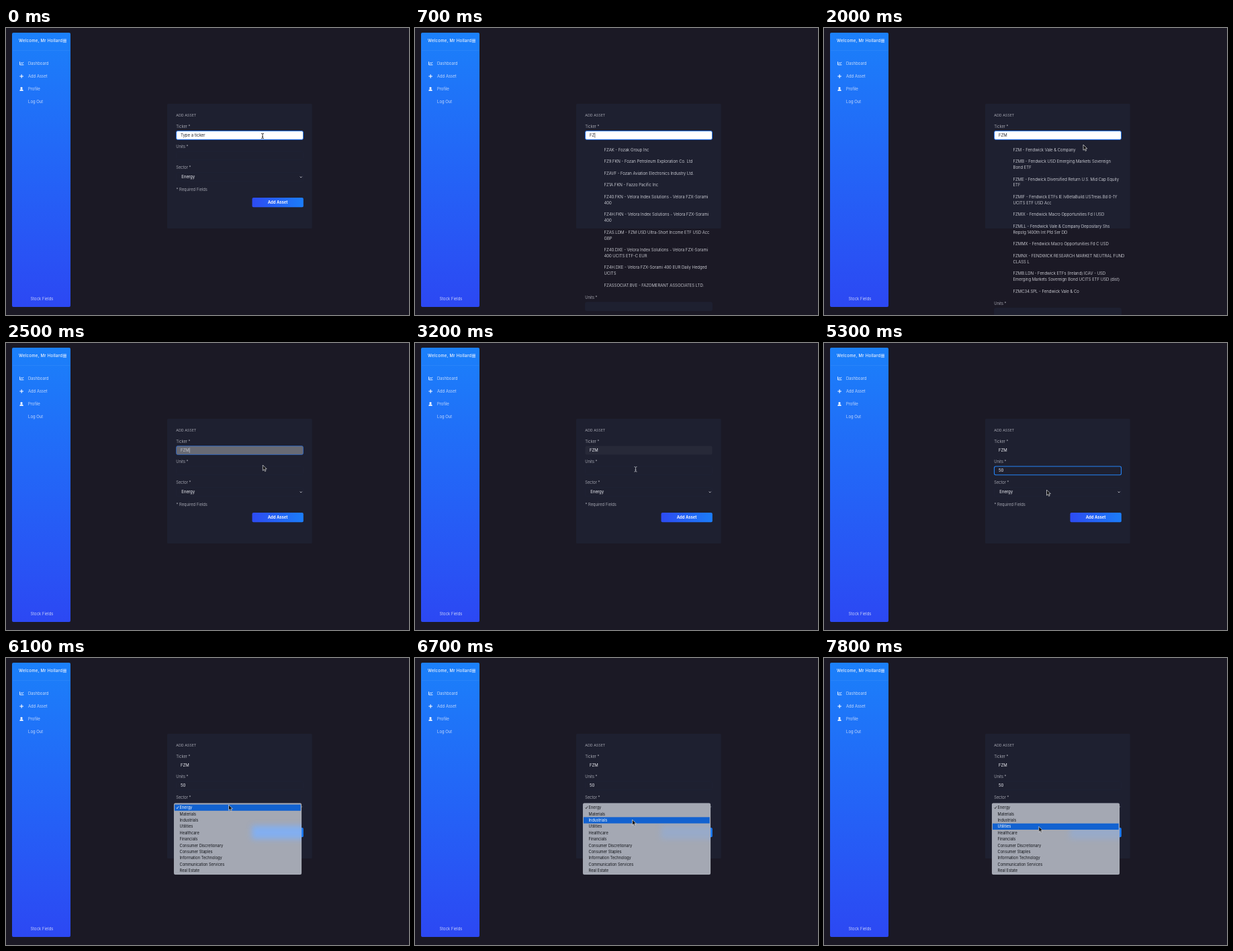
Write an HTML page that moves like this. It is 600 px wide and 428 px high and loops after 8000 ms.

```html
<!DOCTYPE html>
<html lang="en">
<head>
<meta charset="utf-8">
<title>Add asset</title>
<style>
  html, body { margin: 0; width: 100%; height: 100%; overflow: hidden; background: #1b1925; }
  svg { display: block; width: 100%; height: 100%; }
  text { font-family: Inter, "Open Sans", sans-serif; font-size: 6px; fill: #f4f5fb; white-space: pre; }
  .light { font-weight: 300; }
  .label { font-weight: 300; font-size: 5.8px; fill: #c9cad3; }
  .option { font-size: 5.65px; fill: #111318; }
</style>
</head>
<body>
<svg id="stage" viewBox="0 0 600 428">
  <defs>
    <linearGradient id="side" x1="0" y1="0" x2="0" y2="1">
      <stop stop-color="#1b80fa"/><stop offset="1" stop-color="#2c48f3"/>
    </linearGradient>
    <linearGradient id="button">
      <stop stop-color="#2d4bf2"/><stop offset="1" stop-color="#1b7df9"/>
    </linearGradient>
    <filter id="blur" x="-30%" y="-100%" width="160%" height="300%"><feGaussianBlur stdDeviation="4"/></filter>
    <clipPath id="menuClip"><rect x="250" y="216.5" width="190" height="106.5" rx="2"/></clipPath>
  </defs>

  <rect width="600" height="428" fill="#1b1925"/>
  <rect x="9" y="7" width="87" height="409" rx="2" fill="url(#side)"/>
  <path d="M10 33.5H95" stroke="#fff" stroke-opacity=".1" stroke-width=".5"/>
  <path d="M84.7 17H90M84.7 18.4H90M84.7 19.8H90M84.7 21.2H90" stroke="#e4eeff" stroke-width=".75"/>
  <g fill="none" stroke="#fff">
    <path d="M20.6 50.2V54.9H26.4M21.8 53.1L23.1 51.6L24.4 52.8L26.2 50.9" stroke-width=".9"/>
    <path d="M20.3 72H26M23.15 69.2V74.8" stroke-width="1.1"/>
  </g>
  <path d="M20.3 93.8Q20.3 91.3 23 91.3T25.8 93.8Z" fill="#fff"/>
  <circle cx="23" cy="89.5" r="1.6" fill="#fff"/>

  <rect x="240" y="113" width="215.7" height="186" rx="1.5" fill="#1e2030"/>
  <g id="ticker">
    <rect id="tickerBox" x="253.5" y="153.6" width="189" height="12.8" rx="2.2" fill="#fff" stroke="#2070ee"/>
  </g>
  <g id="results"></g>
  <g id="rest">
    <rect id="unitsBox" x="253.5" y="184" width="189" height="12.8" rx="2.2" fill="#1e2030"/>
    <rect x="253.5" y="215.8" width="189" height="12.8" rx="2.2" fill="none" stroke="#23273b" stroke-width=".4"/>
    <path d="M437.7 221.6L439.2 223.1L440.7 221.6" fill="none" stroke="#e8e9f0" stroke-width=".8"/>
    <rect x="366.5" y="253" width="76.3" height="14.2" rx="2" fill="url(#button)"/>
  </g>
  <path id="caret" stroke-width=".6"/>

  <g id="menu">
    <g clip-path="url(#menuClip)">
      <rect x="250" y="216" width="190" height="108" fill="#a4a8b3"/>
      <rect id="glow" x="366" y="250" width="82" height="20" fill="#7db0fb" filter="url(#blur)"/>
    </g>
    <rect x="250.2" y="216.7" width="189.6" height="106.1" rx="2" fill="none" stroke="#c0c3cb" stroke-opacity=".5" stroke-width=".4"/>
    <rect id="highlight" x="251" width="187.7" height="9.3" fill="#1262d0"/>
    <path id="check" d="M253.6 223.3L254.8 224.7L257 221.3" fill="none" stroke-width=".8"/>
  </g>

  <path id="arrow" d="M0 0V8.3L1.9 6.5L3.2 9.4L4.6 8.8L3.3 5.9H5.9Z" fill="#111" stroke="#e6e6ea" stroke-width=".7"/>
  <path id="beam" d="M-2 -3.7Q0 -3.7 0 -2.6Q0 -3.7 2 -3.7M0 -2.7V2.7M-2 3.7Q0 3.7 0 2.6Q0 3.7 2 3.7M-1 1H1" fill="none" stroke-width=".9"/>
</svg>
<script>
const LOOP = 8000;
const $ = id => document.getElementById(id);
const set = (node, attrs) => { for (const k in attrs) node.setAttribute(k, attrs[k]); };
const show = (node, on) => { node.style.display = on ? '' : 'none'; };

// y is the visual middle of the line
function write(parent, x, y, content, attrs = {}) {
  const node = document.createElementNS('http://www.w3.org/2000/svg', 'text');
  set(node, { x, y: y + 2.1, ...attrs });
  node.textContent = content;
  parent.append(node);
  return node;
}

const stage = $('stage'), rest = $('rest'), menu = $('menu');
const light = { class: 'light' }, label = { class: 'label' };

const side = document.createElementNS('http://www.w3.org/2000/svg', 'g');
stage.insertBefore(side, $('ticker'));
write(side, 19, 19, 'Welcome, Mr Hollard', { 'font-weight': 500, 'letter-spacing': .28 });
['Dashboard', 'Add Asset', 'Profile', 'Log Out'].forEach((name, i) => write(side, 33, 52.7 + i * 19.1, name, light));
write(side, 53.5, 404, 'Stock Fields', { class: 'light', 'text-anchor': 'middle' });
write(side, 253.3, 129.8, 'ADD ASSET', { class: 'label', style: 'font-size:5.4px' });
write(side, 253.3, 147.2, 'Ticker *', label);

const tickerText = write($('ticker'), 260, 160, '');
write(rest, 253.3, 177.3, 'Units *', label);
const unitsText = write(rest, 260, 190.3, '');
write(rest, 253.3, 208, 'Sector *', label);
write(rest, 261.3, 222.3, 'Energy');
write(rest, 253.5, 240.7, '* Required Fields', label);
write(rest, 404.7, 260, 'Add Asset', { 'text-anchor': 'middle', 'font-weight': 700, style: 'font-size:5.9px' });

const results = [
  `FZAK - Fozak Group Inc
FZ9.FKN - Fozan Petroleum Exploration Co. Ltd
FZAVF - Fozan Aviation Electronics Industry Ltd.
FZ1A.FKN - Fazzo Pacific Inc
FZ40.FKN - Velora Index Solutions - Velora FZX-Sorami|400
FZ4H.FKN - Velora Index Solutions - Velora FZX-Sorami|400
FZAS.LDM - FZM USD Ultra-Short Income ETF USD Acc|GBP
FZ40.DXE - Velora Index Solutions - Velora FZX-Sorami|400 UCITS ETF-C EUR
FZ4H.DXE - Velora FZX-Sorami 400 EUR Daily Hedged|UCITS
FZASSOCIAT.BVE - FAZOMERANT ASSOCIATES LTD.`,
  `FZM - Fendwick Vale & Company
FZMB - Fendwick USD Emerging Markets Sovereign|Bond ETF
FZME - Fendwick Diversified Return U.S. Mid Cap Equity|ETF
FZMIF - Fendwick ETFs IE IvBetaBuild.USTreas.Bd 0-1Y|UCITS ETF USD Acc
FZMIX - Fendwick Macro Opportunities Fd I USD
FZMLL - Fendwick Vale & Company Depositary Shs|Repstg 1400th Int Pfd Ser DD
FZMMX - Fendwick Macro Opportunities Fd C USD
FZMNX - FENDWICK RESEARCH MARKET NEUTRAL FUND|CLASS L
FZMB.LDN - Fendwick ETFs (Ireland) ICAV - USD|Emerging Markets Sovereign Bond UCITS ETF USD (dist)
FZMC34.SPL - Fendwick Vale & Co`
].map(list => {
  const group = document.createElementNS('http://www.w3.org/2000/svg', 'g');
  let y = 181.7;
  for (const item of list.split('\n')) {
    for (const line of item.split('|')) {
      write(group, 281.5, y, line, light);
      y += 8.78;
    }
    y += 8.78;
  }
  $('results').append(group);
  return { group, shift: y + 1 - 177.3 };
});

const ROW = 9.41;
const options = ['Energy', 'Materials', 'Industrials', 'Utilities', 'Healthcare', 'Financials',
  'Consumer Discretionary', 'Consumer Staples', 'Information Technology', 'Communication Services', 'Real Estate']
  .map((name, i) => write(menu, 258.6, 223.1 + i * ROW, name, { class: 'option' }));

const ease = p => p * p * (3 - 2 * p);
function track(points, t, curve = p => p) {
  const i = points.findIndex(p => p[0] > t);
  if (i < 0) return points[points.length - 1].slice(1);
  if (i === 0) return points[0].slice(1);
  const a = points[i - 1], b = points[i], p = curve((t - a[0]) / (b[0] - a[0]));
  return a.slice(1).map((v, k) => v + (b[k + 1] - v) * p);
}
const stepAt = (steps, t) => steps.filter(s => s[0] <= t).pop()[1];

const pointerPath = [[0, 382, 161], [1600, 382, 161], [2000, 386, 174], [2400, 382.3, 182], [2550, 382.3, 182],
  [3400, 319.7, 189.3], [4500, 319.7, 189.3], [5250, 331.5, 219], [6200, 331.5, 219], [7000, 319.8, 251.3]];
const pointerKind = [[0, 'beam'], [300, ''], [1600, 'beam'], [1800, 'arrow'], [3200, 'beam'],
  [4000, ''], [4500, 'beam'], [4800, 'arrow']];
const tickerTyping = [[0, 'Type a ticker'], [300, 'F'], [500, 'FZ'], [1100, 'FZM']];
const unitsTyping = [[0, ''], [4100, '5'], [4300, '50']];
const listShown = [[0, -1], [600, 0], [1200, 1], [2450, -1]];
const tickerFade = [[2400, 1, 1], [2500, .33, .6], [2700, .04, 0], [4300, .04, 0], [4500, 0, 0]];
const MENU_OPEN = 5400;

function render(t) {
  const list = stepAt(listShown, t);
  results.forEach((r, i) => show(r.group, i === list));
  set(rest, { transform: `translate(0 ${list < 0 ? 0 : results[list].shift})` });

  const [fill, stroke] = track(tickerFade, t);
  set($('tickerBox'), { 'fill-opacity': fill, 'stroke-opacity': stroke });
  tickerText.textContent = stepAt(tickerTyping, t);
  tickerText.style.fill = t < 2450 ? '#22242c' : t < 2600 ? '#c3c4ca' : '#f0f1f6';

  const unitsFocus = t >= 3500 && t < MENU_OPEN;
  set($('unitsBox'), { stroke: unitsFocus ? '#2583f5' : '#23273b', 'stroke-width': unitsFocus ? 1.1 : .4 });
  unitsText.textContent = stepAt(unitsTyping, t);

  const inTicker = t >= 300 && t < 2600;
  const field = inTicker ? tickerText : unitsText;
  const x = 260.5 + (field.textContent ? field.getComputedTextLength() : 0);
  const y = inTicker ? 160 : 190.3;
  show($('caret'), (inTicker || unitsFocus) && Math.floor(t / 500) % 2);
  set($('caret'), { d: `M${x} ${y - 3.8}V${y + 3.8}`, stroke: t < 2450 ? '#222' : '#d5d6dd' });

  const [px, py] = track(pointerPath, t, ease);
  show(menu, t >= MENU_OPEN);
  const row = Math.max(0, Math.min(3, Math.floor((py + .8 - 218.4) / ROW)));
  set($('highlight'), { y: 218.5 + row * ROW });
  options.forEach((o, i) => { o.style.fill = i === row ? '#fff' : ''; });
  set($('check'), { stroke: row ? '#111318' : '#fff' });
  set($('glow'), { opacity: track([[6150, .85], [6500, .3]], t)[0] });

  const kind = stepAt(pointerKind, t);
  for (const name of ['arrow', 'beam']) {
    show($(name), kind === name);
    set($(name), { transform: `translate(${px} ${py})` });
  }
  set($('beam'), { stroke: t < 2400 ? '#222' : '#aeb0b8' });
}

let start;
function tick(now) {
  start ??= now;
  render((now - start) % LOOP);
  requestAnimationFrame(tick);
}
render(0);
requestAnimationFrame(tick);
</script>
</body>
</html>
```
